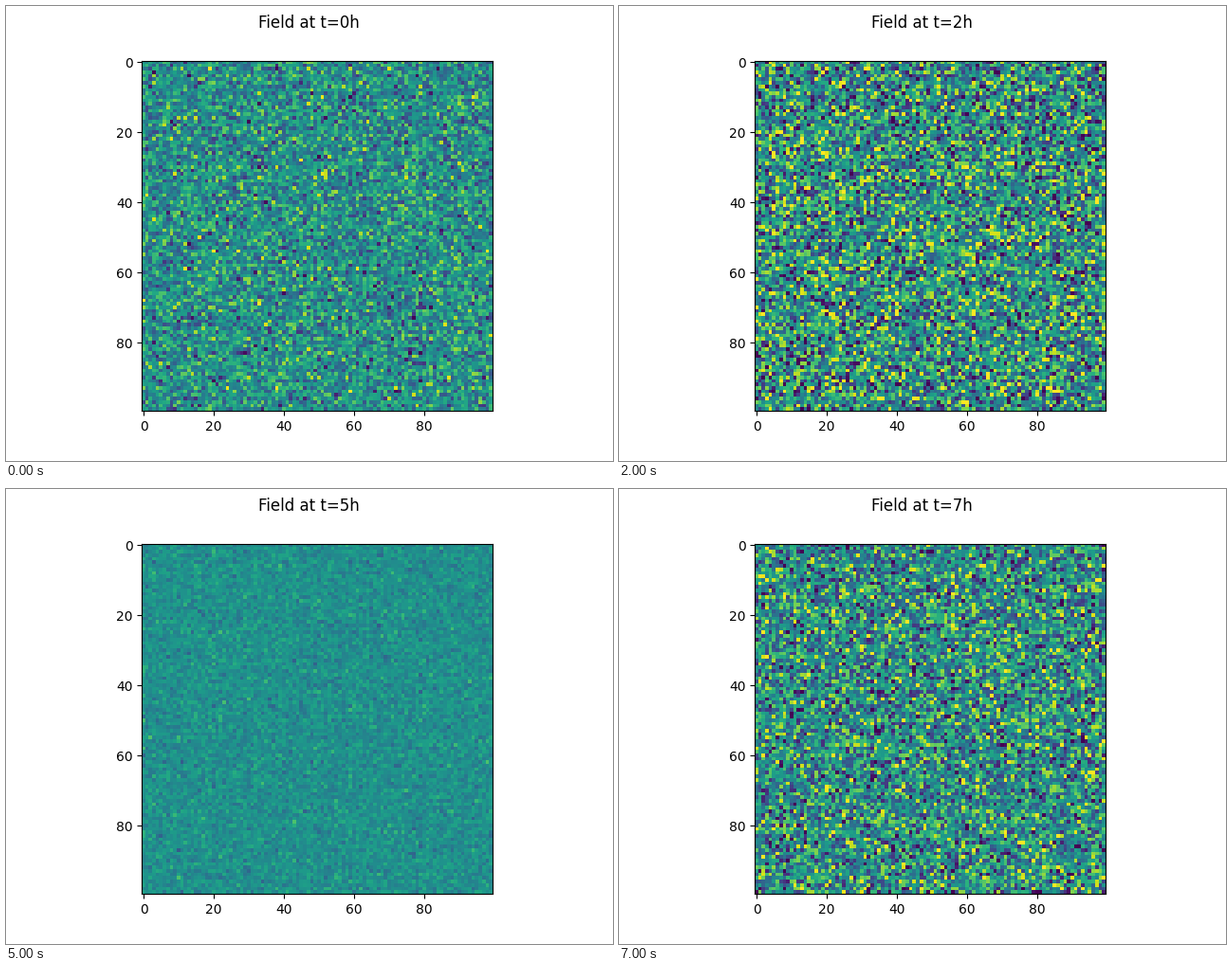
A matplotlib script for the animation above (8 s loop, 640 px wide and 480 px high).

```python
import numpy as np
import matplotlib.pyplot as plt
from matplotlib.animation import FuncAnimation

SIZE = 100
HOURS = 8
LIMIT = 3.0
SWING = 0.65


def field(hour):
    """Gaussian noise whose spread swings sinusoidally with time."""
    rng = np.random.default_rng(hour)
    spread = 1 + SWING * np.sin(hour)
    return spread * rng.standard_normal((SIZE, SIZE))


fig, ax = plt.subplots(figsize=(6.4, 4.8), dpi=100)
image = ax.imshow(field(0), cmap="viridis", vmin=-LIMIT, vmax=LIMIT)
title = fig.suptitle("Field at t=0h", x=0.4988, y=0.982)


def update(hour):
    image.set_data(field(hour))
    title.set_text(f"Field at t={hour}h")
    return image, title


anim = FuncAnimation(fig, update, frames=HOURS, interval=1000,
                     repeat=True, repeat_delay=0, blit=False)
plt.show()
```
